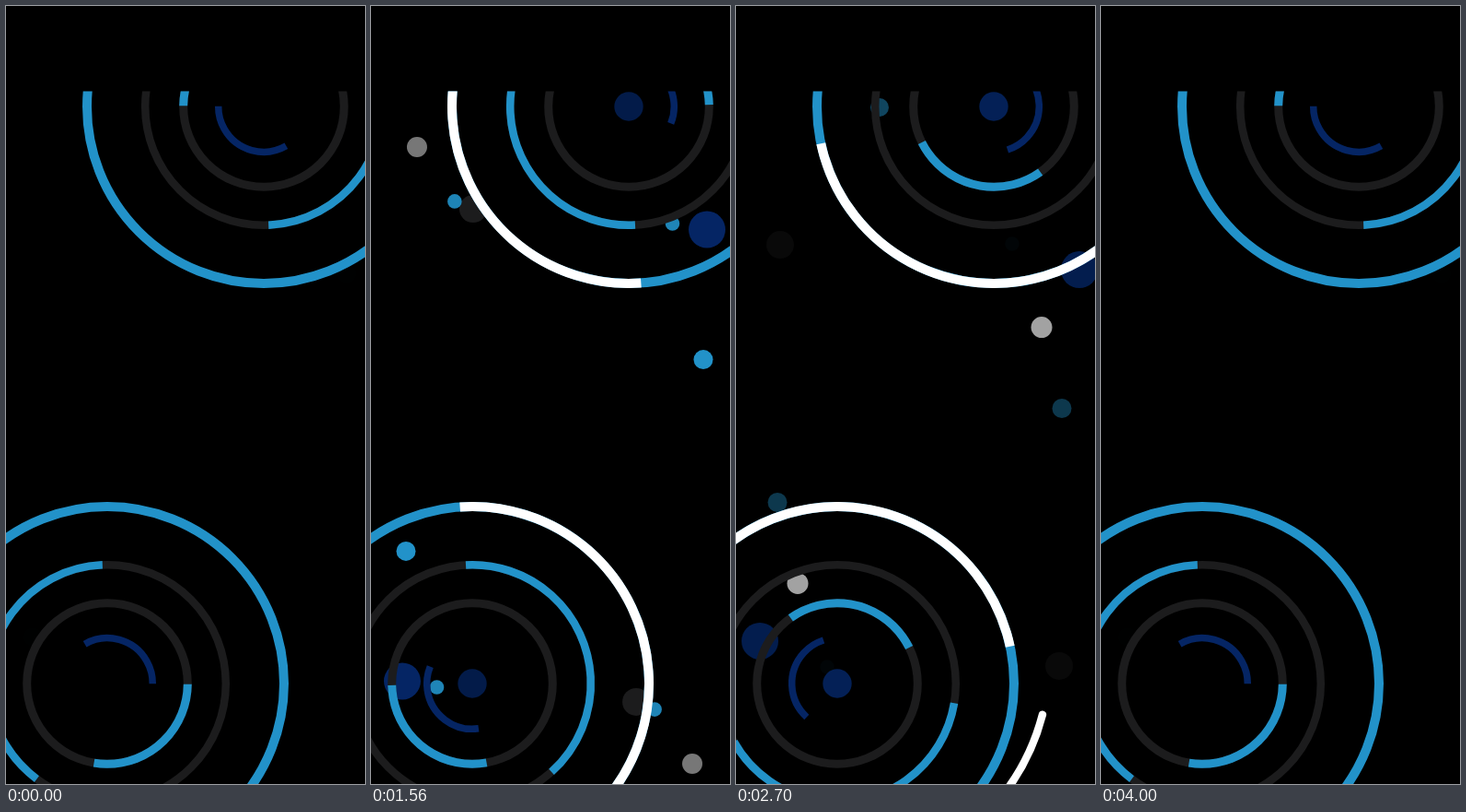
Write an HTML page with a canvas that moves like this. It is 390 px wide and 844 px high and loops after 4020 ms.

```html
<!DOCTYPE html>
<html lang="en">
<head>
<meta charset="utf-8">
<title>Orbits</title>
<style>
  html, body { margin: 0; width: 100%; height: 100%; overflow: hidden; background: #000; }
  canvas { display: block; }
</style>
</head>
<body>
<canvas id="stage" width="390" height="844"></canvas>
<script>
const ctx = document.getElementById('stage').getContext('2d');
const LOOP = 4020;
const BLUE = '#2292c9', NAVY = '#052564', GREY = '#1c1c1d', WHITE = '#fff';
const CX = 280, CY = 109;

// fade: start of fade-in, full, start of fade-out, gone; path: [time, x, y]
const dots = [
  { r: 20, color: NAVY, fade: [0, 600, 2400, 3800],
    path: [[1040, 346, 217.5], [1560, 365, 242.5], [2220, 373.5, 270], [2700, 373, 286], [3360, 373, 302.5]] },
  { r: 15, color: GREY, fade: [0, 1520, 2080, 3000],
    path: [[1040, 152, 198], [1560, 111, 220], [2220, 65, 244.5], [2700, 48, 259]] },
  { r: 11, color: WHITE, fade: [-1, 0, 870, 2170],
    path: [[1040, 64.5, 121], [1560, 50, 153]] },
  { r: 11.5, color: WHITE, fade: [1600, 1950, 1960, 4000],
    path: [[2220, 325, 319], [2700, 332, 348.5], [3360, 336, 391]] },
  { r: 10.5, color: BLUE, fade: [0, 500, 2220, 3000],
    path: [[1040, 364, 352.5], [1560, 361, 383.5], [2220, 357, 416.5], [2700, 354, 436.5]] },
  { r: 7.8, color: BLUE, fade: [0, 1350, 1450, 2680],
    path: [[1040, 93.5, 200], [2220, 87.5, 227]] },
  { r: 7.8, color: BLUE, fade: [1050, 1400, 1450, 2740],
    path: [[1560, 327.5, 236], [2220, 310.5, 248.5], [2700, 300, 258]] },
  { r: 10, color: BLUE, fade: [1560, 1900, 2150, 3200],
    path: [[2220, 166.5, 98], [2700, 156, 110]] }
];

const clamp = v => Math.max(0, Math.min(1, v));
const rad = deg => deg * Math.PI / 180;

function opacity([a, b, c, d], t) {
  return Math.min(clamp((t - a) / (b - a)), clamp((d - t) / (d - c)));
}

function position(path, t) {
  let i = 1;
  while (i < path.length - 1 && t > path[i][0]) i++;
  const [t0, x0, y0] = path[i - 1], [t1, x1, y1] = path[i];
  const k = (t - t0) / (t1 - t0);
  return [x0 + (x1 - x0) * k, y0 + (y1 - y0) * k];
}

function disc(x, y, r, color, alpha) {
  ctx.globalAlpha = alpha;
  ctx.fillStyle = color;
  ctx.beginPath();
  ctx.arc(x, y, r, 0, 2 * Math.PI);
  ctx.fill();
  ctx.globalAlpha = 1;
}

function arc(r, width, color, start = 0, span = 360, x = CX, y = CY) {
  ctx.strokeStyle = color;
  ctx.lineWidth = width;
  ctx.beginPath();
  ctx.arc(x, y, r, rad(start), rad(start + span));
  ctx.stroke();
}

function streak(t) {
  if (t < 1600 || t > 3300) return;
  const k = (t - 2220) / 480;
  ctx.lineCap = 'round';
  arc(240, 8.5, WHITE, 111.8 + 82.6 * k, 26.4, 277 + 12.3 * k, 124 + 11.6 * k);
  ctx.lineCap = 'butt';
}

function cluster(t, dx, dy) {
  for (const d of dots) {
    const [x, y] = position(d.path, t);
    disc(x + dx, y + dy, d.r, d.color, opacity(d.fade, t));
  }
  disc(CX, CY, 15.7, NAVY, opacity([0, 2120, 2500, 4000], t));
  arc(49.3, 7.5, NAVY, 60 + 0.36 * t, 120);
  arc(87.3, 9, GREY);
  arc(87.3, 9, BLUE, 180.7 - 0.18 * t, 99);
  arc(128.8, 8.5, GREY);
  arc(128.8, 8.5, BLUE, 306.4 + 0.09 * t, 141.2);
  arc(192, 10, BLUE);
  arc(192, 10, WHITE, 226.5 - 0.09 * t, 184.5);
  streak(t);
}

function draw(now) {
  const t = now % LOOP % 4000;
  ctx.fillStyle = '#000';
  ctx.fillRect(0, 0, 390, 844);
  ctx.save();
  ctx.beginPath();
  ctx.rect(0, 92.5, 390, 752);
  ctx.clip();
  cluster(t, 0, 0);
  // the same cluster turned half a circle, its dots slightly shifted
  ctx.translate(390, 844);
  ctx.rotate(Math.PI);
  cluster(t, -9, -131);
  ctx.restore();
}

const begin = performance.now();
function tick() {
  draw(performance.now() - begin);
  requestAnimationFrame(tick);
}
tick();
</script>
</body>
</html>
```
